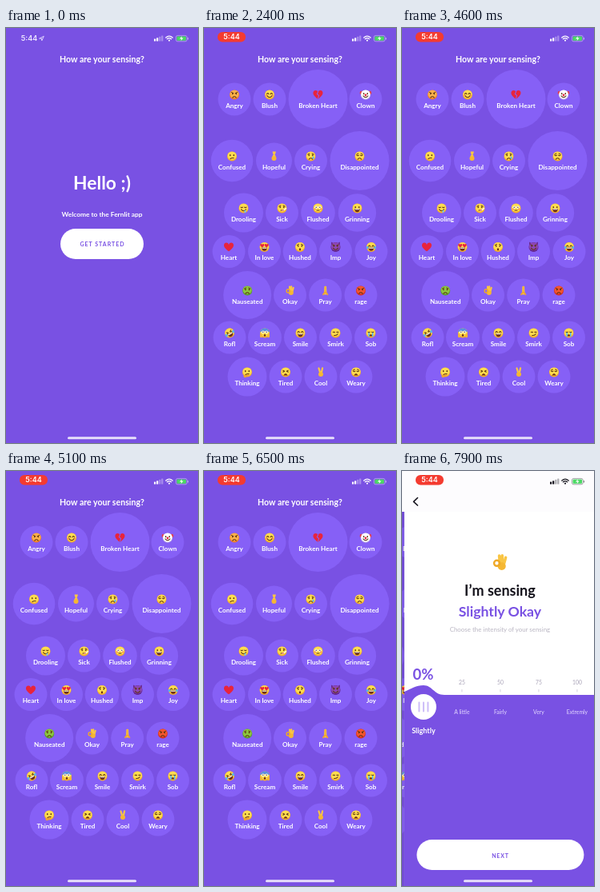
An HTML page that plays this animation: 240 by 519 pixels, repeating every 8000 ms.

```html
<!DOCTYPE html>
<html lang="en">
<head>
<meta charset="utf-8">
<title>Mood picker</title>
<style>
  html, body { margin: 0; height: 100%; overflow: hidden; background: #7951e3; }
  svg { display: block; width: 100vw; height: 100vh; }
  text { font-family: Lato, "Open Sans", sans-serif; }
  .clock { font-family: Inter, Roboto, sans-serif; }
</style>
</head>
<body>
<svg id="stage" viewBox="0 0 240 519"></svg>
<script>
const PURPLE = '#7951e3', LOOP = 8000;

const text = (x, y, size, str, fill = '#fff', weight = 700, extra = 'text-anchor="middle"') =>
  `<text x="${x}" y="${y}" font-size="${size}" fill="${fill}" font-weight="${weight}" ${extra}>${str}</text>`;
const dot = (x, y, r, fill, ry = r) => `<ellipse cx="${x}" cy="${y}" rx="${r}" ry="${ry}" fill="${fill}"/>`;
const stroke = (d, color = '#5d3510', width = .17) =>
  `<path d="${d}" fill="none" stroke="${color}" stroke-width="${width}" stroke-linecap="round" stroke-linejoin="round"/>`;
const shape = (d, fill) => `<path d="${d}" fill="${fill}"/>`;
const box = (x, y, w, h, r, fill, extra = '') =>
  `<rect x="${x}" y="${y}" width="${w}" height="${h}" rx="${r}" fill="${fill}" ${extra}/>`;
const group = (id, body, extra = '') => `<g id="${id}" ${extra}>${body}</g>`;
const both = draw => draw(-.38) + draw(.38);
const heart = (x, y, s) =>
  `<path transform="translate(${x} ${y}) scale(${s})" fill="#e8243c" d="M0 .9C-1.5-.1-1-.9-.5-.9Q-.1-.9 0-.5Q.1-.9 .5-.9C1-.9 1.5-.1 0 .9"/>`;

// Emoji parts, drawn inside a unit circle
const hand = (fingers, x = 0) => stroke(fingers, '#f9c544', .36) + dot(x, .45, .5, '#f5b733', .48);
const face = (top, bottom) => dot(0, 0, 1, bottom) + dot(0, -.12, .92, top, .84);
const parts = {
  yellow: face('#ffdc4f', '#f4ae2c'),
  orange: face('#fbb04a', '#ee7b2b'),
  red: face('#f2552f', '#d5301f'),
  green: face('#8cc63f', '#5a9a2c'),
  white: face('#fff', '#e4dfea'),
  blue: face('#ffdc4f', '#f4ae2c') + shape('M-.98-.2A1 1 0 0 1 .98-.2Q0-.5-.98-.2', '#5b8fe0'),
  horns: shape('M-.9-1.05Q-1 0-.5-.2L-.3-.75ZM.9-1.05Q1 0 .5-.2L.3-.75Z', '#6b2b91') + face('#8d46b5', '#64278a'),
  hair: dot(-.85, -.4, .38, '#e33d4d') + dot(.85, -.4, .38, '#e33d4d'),
  nose: dot(0, .08, .22, '#e8243c'),
  dots: both(x => dot(x, -.2, .13, '#5d3510', .18)),
  happy: both(x => stroke(`M${x - .2}-.12Q${x}-.5 ${x + .2}-.12`)),
  shut: both(x => stroke(`M${x - .2}-.22Q${x} 0 ${x + .2}-.22`)),
  wide: both(x => dot(x, -.18, .3, '#fff') + dot(x, -.18, .13, '#5d3510')),
  side: both(x => stroke(`M${x - .18}-.2H${x + .2}`) + dot(x + .1, -.12, .1, '#5d3510')),
  cross: stroke('M-.55-.38L-.22-.2L-.55-.02M.55-.38L.22-.2L.55-.02'),
  hearts: both(x => heart(x * 1.2, -.28, .42)),
  brows: stroke('M-.62-.5L-.2-.3M.62-.5L.2-.3'),
  worry: stroke('M-.62-.38L-.25-.58M.62-.38L.25-.58'),
  smile: stroke('M-.5 .25Q0 .85 .5 .25'),
  frown: stroke('M-.38 .62Q0 .2 .38 .62'),
  open: shape('M-.6 .12H.6Q.5 .82 0 .82T-.6 .12', '#6d2f17') + shape('M-.52 .14H.52L.46 .32H-.46Z', '#fff'),
  wail: shape('M-.45 .7Q0-.2 .45 .7Z', '#6d2f17'),
  slant: stroke('M-.35 .52Q0 .3 .38 .38'),
  smirk: stroke('M-.3 .5Q.25 .55 .45 .22'),
  flat: stroke('M-.25 .45H.25'),
  round: dot(0, .48, .2, '#6d2f17', .25),
  cheeks: both(x => dot(x * 1.6, .16, .22, '#f58a58', .16)),
  tear: dot(.5, .3, .17, '#52b6f0', .3),
  tears: both(x => dot(x * 2.1, .12, .22, '#52b6f0', .3)),
  streams: both(x => box(x - .13, -.1, .26, .9, .1, '#52b6f0')),
  drool: dot(.32, .65, .16, '#6cc4f2', .32),
  gauge: stroke('M.05 .5L.85 .05', '#fff', .2) + stroke('M.05 .5L.3 .36', '#e8243c', .14),
  palms: both(x => dot(x * 2, .55, .26, '#f5b733', .42)),
  chin: stroke('M-.5 .85L.2 .6', '#e99a28', .3) + dot(-.45, .85, .3, '#f0a52f'),
  heart: heart(0, 0, 1),
  crack: stroke('M0-.55L-.2-.15L.18 .15L0 .75', '#8660f6', .17),
  fingers: hand('M-.2 .2L.2-.85M.22 .2L-.12-.85'),
  okay: hand('M.02 .2L-.08-.82M.25 .2L.28-.85M.45 .3L.7-.6', .22) +
    `<circle cx="-.38" cy=".08" r=".34" fill="none" stroke="#efa928" stroke-width=".24"/>`,
  pray: stroke('M-.14 .7L-.08-.8M.14 .7L.08-.8', '#f9c544', .3) + stroke('M0 .5V-.8', '#d98c20', .08) +
    stroke('M-.45 .8L-.15 .4M.45 .8L.15 .4', '#f0a52f', .3),
  peace: hand('M-.1 .2L-.42-.82M.12 .2L.35-.85'),
};
const emoji = (x, y, size, spec, turn = 0) =>
  `<g transform="translate(${x} ${y}) rotate(${turn}) scale(${size})">${spec.split(' ').map(k => parts[k]).join('')}</g>`;

// Rows: centre y, then "label,x,radius,emoji parts"
const rows = {
  89: ['Angry,38,20.5,orange dots brows frown', 'Blush,82,20.5,yellow happy cheeks smile',
    'Broken Heart,142.5,37,heart crack', 'Clown,202,20.5,hair white dots nose smile'],
  166: ['Confused,35,26.3,yellow dots slant', 'Hopeful,87.5,22.5,fingers',
    'Crying,133.5,20.5,yellow dots worry frown tear', 'Disappointed,194.5,37,yellow shut worry frown'],
  231: ['Drooling,49.5,24.5,yellow shut smile drool', 'Sick,97.5,20.5,yellow dots worry flat gauge',
    'Flushed,142.5,21.3,yellow wide cheeks flat', 'Grinning,191.5,23.7,yellow dots open'],
  279.5: ['Heart,31,20.5,heart', 'In love,75.5,20.5,yellow hearts open', 'Hushed,120,21.3,yellow dots worry round',
    'Imp,164.5,20.5,horns dots brows smile', 'Joy,209,20.5,yellow happy open tears'],
  334: ['Nauseated,54.2,30,green worry dots frown', 'Okay,107.5,20.5,okay', 'Pray,151.7,20.5,pray',
    'rage,196,20.5,red dots brows frown'],
  387: ['Rofl,32,20.5,yellow cross open tears,-30', 'Scream,76,21,blue wide round palms', 'Smile,120.5,20.5,yellow happy open',
    'Smirk,164.5,20.5,yellow side smirk', 'Sob,208.5,20.5,yellow shut wail streams'],
  436: ['Thinking,54,24.5,yellow dots slant chin', 'Tired,102,20.5,yellow cross wail', 'Cool,146,20.5,peace',
    'Weary,190,20.5,yellow shut worry wail'],
};
const bubbles = Object.entries(rows).map(([cy, row]) => row.map(item => {
  const [label, x, r, spec, turn] = item.split(',');
  return dot(x, cy, r, '#8660f6') + emoji(x, cy - 5.6, 6, spec, turn) + text(x, +cy + 10.8, 8.1, label);
}).join('')).join('');

const spokes = Array.from({ length: 12 }, (_, i) =>
  `<path d="M0-4.2V-7.6" stroke="#fff" stroke-width="1.5" stroke-linecap="round" opacity="${.5 + i / 22}" transform="rotate(${i * 30})"/>`).join('');

const welcome = text(120, 202, 22.8, 'Hello ;)') + text(120, 235.8, 8.4, 'Welcome to the Fernlit app') +
  box(68, 251, 104, 38, 19, '#fff') +
  text(120.5, 273.3, 7, 'GET STARTED', PURPLE, 700, 'text-anchor="middle" letter-spacing="1"');

const scale = [['25', 'A little'], ['50', 'Fairly'], ['75', 'Very'], ['100', 'Extremly']].map(([n, label], i) => {
  const x = 72 + 48 * i;
  return text(x, 266.5, 6.8, n, '#a9a3b8', 400) + stroke(`M${x} 273.5V276`, '#c9c4d6', .8) +
    text(x, 304, 6.8, label, '#e3d8ff', 400);
}).join('');
const detail = box(-4, 51, 4, 468, 0, '#000', 'opacity=".07"') + box(0, 0, 240, 519, 0, '#fff') +
  shape('M0 276C10 272 14 268 24 268C35 268 37 280 50 280H240V519H0Z', PURPLE) +
  emoji(119.5, 114.5, 10.2, 'okay') + text(119.5, 155.5, 18, 'I’m sensing', '#15131c') +
  text(119.5, 181.8, 17.7, 'Slightly Okay', PURPLE) +
  text(119.5, 200.8, 7.9, 'Choose the intensity of your sensing', '#b9b5c2', 400) +
  text(23.5, 261, 18.5, '0%', PURPLE) + scale + dot(24, 295, 16, '#fff') +
  stroke('M18.5 289.5V300.5M24 289.5V300.5M29.5 289.5V300.5', '#cdbcf8', 2) +
  text(24, 328.3, 9, 'Slightly') + box(15.5, 461, 209, 38, 19, '#fff') +
  text(120, 483.5, 7, 'NEXT', PURPLE, 700, 'text-anchor="middle" letter-spacing=".8"');

const clock = (id, x, y, fill) => group(id, text(x, y, 9, '5:44', fill, 600, 'class="clock" text-anchor="middle"'));
const status =
  group('intro', clock('plain', 29, 16.2, '#f0eaff') + stroke('M42 13L47.3 10.3L44.8 15.8L44.4 13.3Z', '#e6dcff', .9)) +
  group('pill', box(17, 5, 35, 12.5, 6, '#f43b30') + clock('time', 34.5, 14.3, '#fff') +
    group('record', `<circle cx="34.5" cy="11.2" r="4.6" fill="none" stroke="#fff" stroke-width="1.3"/>` + dot(34.5, 11.2, 2.6, '#fff'))) +
  group('icons', box(185, 13.5, 2.2, 3, .5, 'currentColor') + box(188.1, 12.2, 2.2, 4.3, .5, 'currentColor') +
    box(191.2, 10.8, 2.2, 5.7, .5, 'currentColor', 'opacity=".35"') + box(194.2, 9.4, 2.2, 7.1, .5, 'currentColor', 'opacity=".35"') +
    stroke('M199.8 12Q204 8.4 208.2 12M201.4 13.7Q204 11.5 206.6 13.7', 'currentColor', 1.3) + dot(204, 15.6, 1.1, 'currentColor') +
    `<rect x="212.4" y="9.4" width="13.8" height="7.4" rx="2.2" fill="none" stroke="currentColor" stroke-width=".7" opacity=".55"/>` +
    box(213.5, 10.5, 11.6, 5.2, 1.2, '#4bd964') + shape('M219.9 10.2L217 13.6H219.2L218.6 16L221.6 12.5H219.4Z', '#fff') +
    box(227, 11.8, 1, 2.6, .5, 'currentColor', 'opacity=".55"'));

const $ = id => document.getElementById(id);
$('stage').innerHTML = box(0, 0, 240, 519, 0, PURPLE) +
  group('spinner', spokes) + group('welcome', welcome) + group('list', bubbles) + group('detail', detail) +
  group('header', box(0, 0, 240, 51, 0, PURPLE) + group('whiteHeader', box(0, 0, 240, 51, 0, '#fff') + stroke('M19.5 33.5L14.5 38.3L19.5 43', '#15131c', 1.6))) +
  group('title', text(120, 43, 10.6, 'How are your sensing?')) + status +
  box(77, 511.3, 86, 3, 1.5, '#fff', 'opacity=".82"');

const clamp = v => Math.max(0, Math.min(1, v));
const ease = (t, from, to) => { const p = clamp((t - from) / (to - from)); return p * p * (3 - 2 * p); };
const move = (id, x, y) => $(id).setAttribute('transform', `translate(${x} ${y})`);
const fade = (id, v) => $(id).setAttribute('opacity', v);

function render(t) {
  const loaded = ease(t, 2150, 2350), pull = ease(t, 750, 1050);
  const s = Math.max(0, t - 7400) * .0128, push = 1 - (1 + s) * Math.exp(-s);
  const scroll = ease(t, 5600, 5950) - ease(t, 6080, 6500);

  move('welcome', 0, 35 * pull);
  fade('welcome', 1 - loaded);
  $('spinner').setAttribute('transform', `translate(120 68) rotate(${Math.floor(t / 83.333) * 30})`);
  fade('spinner', pull * (1 - loaded));
  move('list', -72 * push, -25.5 * scroll);
  fade('list', loaded);
  move('detail', 240 * (1 - push), 0);
  fade('detail', push > 0 ? 1 : 0);
  fade('whiteHeader', push);
  fade('title', 1 - push);

  const recording = t >= 500, showTime = t >= 2400;
  fade('intro', recording ? 0 : 1);
  fade('pill', recording ? 1 : 0);
  fade('time', showTime ? 1 : 0);
  fade('record', showTime ? 0 : 1);
  $('icons').style.color = push > .5 ? '#15131c' : '#fff';
}

const start = performance.now();
function frame() {
  render((performance.now() - start) % LOOP);
  requestAnimationFrame(frame);
}
frame();
</script>
</body>
</html>
```
